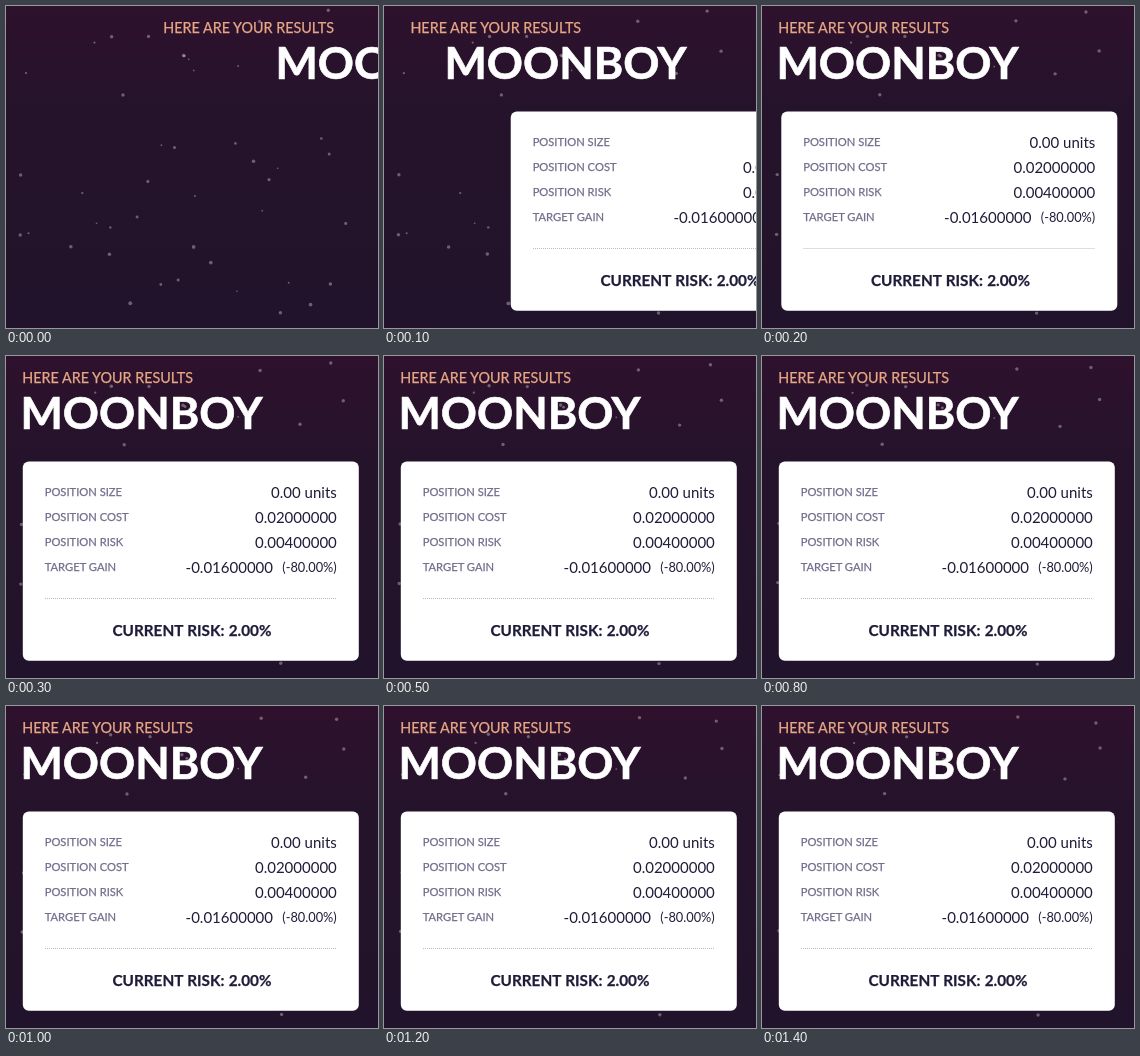
An HTML page that plays this animation: 372 px wide and 322 px high, repeating every 1500 ms.

```html
<!DOCTYPE html>
<html lang="en">
<head>
<meta charset="utf-8">
<title>Results</title>
<style>
  html, body { margin: 0; width: 100%; height: 100%; overflow: hidden; background: #23132b; }
  svg { display: block; width: 372px; height: 322px; font-family: Lato, "Open Sans", sans-serif; }
  .intro { font-size: 14.35px; fill: #e8a785; stroke: #e8a785; stroke-width: .25px; }
  .title { font-size: 44.8px; font-weight: 700; fill: #fff; stroke: #fff; stroke-width: .7px; }
  .label { font-size: 11.2px; fill: #716d8b; stroke: #716d8b; stroke-width: .25px; }
  .value { font-size: 15px; fill: #1e1c39; text-anchor: end; }
  .note { font-size: 12.8px; }
  .total { font-size: 15.3px; font-weight: 700; word-spacing: .6px; fill: #1e1c39;
           stroke: #1e1c39; stroke-width: .25px; text-anchor: middle; }
</style>
</head>
<body>
<svg viewBox="0 0 372 322">
  <defs>
    <linearGradient id="sky" x2="0" y2="1">
      <stop offset="0" stop-color="#2e112d"/>
      <stop offset=".32" stop-color="#25132b"/>
      <stop offset="1" stop-color="#21132b"/>
    </linearGradient>
  </defs>
  <rect width="372" height="322" fill="url(#sky)"/>
  <g id="stars" fill="#fff" fill-opacity=".33"></g>
  <text id="intro" class="intro" x="16.3" y="26.8">HERE ARE YOUR RESULTS</text>
  <text id="title" class="title" x="14.5" y="73.4">MOONBOY</text>
  <g id="card">
    <rect x="16.8" y="105.4" width="336" height="199.4" rx="6" fill="#fff"/>
    <g id="rows"></g>
    <path d="M39 242.5H331" stroke="#bcbac6" stroke-dasharray="1"/>
    <text class="total" x="186" y="279.8">CURRENT RISK: 2.00%</text>
  </g>
</svg>
<script>
const LOOP = 1500, STEP = 100;
const $ = id => document.getElementById(id);

function add(parent, tag, attrs, text = '') {
  const el = document.createElementNS('http://www.w3.org/2000/svg', tag);
  for (const key in attrs) el.setAttribute(key, attrs[key]);
  el.textContent = text;
  parent.append(el);
  return el;
}

// Card rows: label, value, optional note
[
  ['POSITION SIZE', '0.00 units'],
  ['POSITION COST', '0.02000000'],
  ['POSITION RISK', '0.00400000'],
  ['TARGET GAIN', '-0.01600000', '(-80.00%)']
].forEach(([label, value, note], i) => {
  const y = 140 + i * 25.1;
  add($('rows'), 'text', { class: 'label', x: 38.7, y }, label);
  add($('rows'), 'text', { class: 'value', x: note ? 267 : 330.8, y: y + 1.8 }, value);
  if (note) add($('rows'), 'text', { class: 'value note', x: 330.8, y: y + .8 }, note);
});

let seed = 7;
const rand = (min, max) => {
  seed = seed * 16807 % 2147483647;
  return min + (max - min) * seed / 2147483647;
};

const stars = [];
function addStar(cx, cy, r, vx, vy) {
  stars.push({ el: add($('stars'), 'circle', { cx, cy, r }), vx, vy });
}

function scatter(count, left, top, right, bottom) {
  for (let i = 0; i < count; i++)
    addStar(rand(left, right), rand(top, bottom), rand(.8, 1.9), rand(-3, 3), rand(-3, 3));
}

// Bright stars that stay in view: x, y, velocity in px/s
[
  [291.5, 67, 8.2, 4.2], [337, 45.4, .8, -2.4], [322.3, 4.2, 8.3, 9.1], [253.6, 15.5, 1.6, -3.2],
  [274.4, 306.8, 1.2, 1.6], [14.2, 229, 2, -3], [14.6, 169, 3, -2], [117, 89, 4, -1]
].forEach(([x, y, vx, vy]) => addStar(x, y, 1.7, vx, vy));
scatter(9, 20, 10, 250, 72);
scatter(28, 22, 110, 350, 300);

// Distance left to travel, easing out over the span
const slide = (t, dist, span, power) => dist * Math.max(0, 1 - t / span) ** power;
const move = (el, x, y = 0) => el.setAttribute('transform', `translate(${x.toFixed(2)} ${y.toFixed(2)})`);

function draw(t) {
  move($('intro'), slide(t, 141, 200, 3.8));
  move($('title'), slide(t, 255, 200, 2.47));
  move($('card'), slide(t, 1006, 300, 5.46));
  for (const { el, vx, vy } of stars) move(el, vx * t / 1000, vy * t / 1000);
}

function tick() {
  const t = performance.now() % LOOP;
  draw(Math.floor(t / STEP) * STEP);
  requestAnimationFrame(tick);
}
tick();
</script>
</body>
</html>
```
